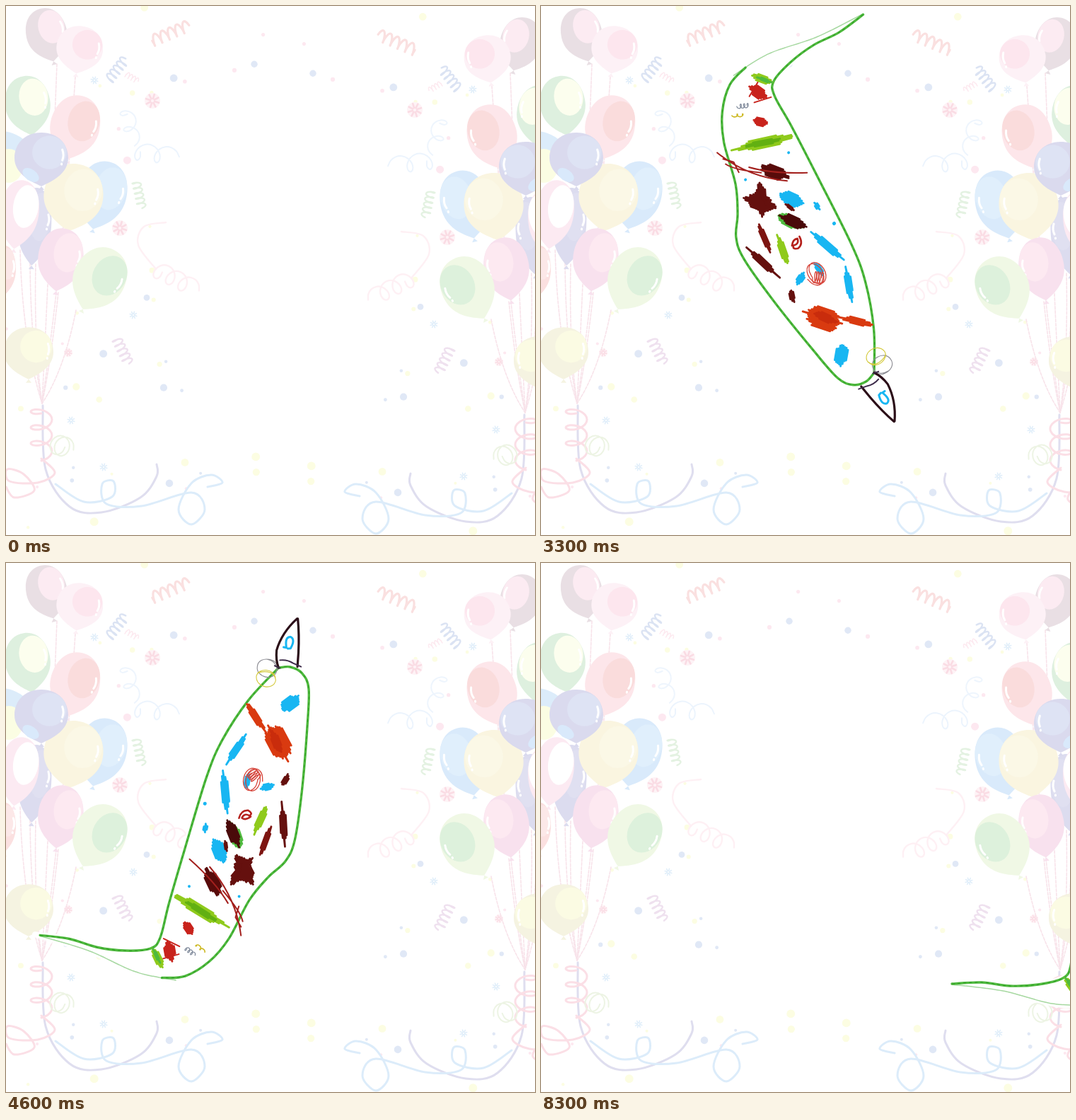
An HTML page that plays this animation: 748x748 px, repeating every 8.8 s.

```html
<!DOCTYPE html>
<html lang="en">
<head>
<meta charset="utf-8">
<title>Party worm</title>
<style>
html, body { margin: 0; width: 100%; height: 100%; overflow: hidden; background: #fff; }
svg { display: block; width: 100vw; height: 100vh; }
</style>
</head>
<body>
<svg id="stage" viewBox="0 0 748 748" fill="none" stroke-linecap="round" stroke-linejoin="round">
  <g id="party"></g>
  <use href="#party" transform="translate(785 13) scale(-1 1)"/>
  <g id="worm" visibility="hidden"></g>
</svg>
<script>
const $ = id => document.getElementById(id);

let seed = 7;
const random = () => (seed = seed * 16807 % 2147483647) / 2147483647;

const line = (d, color, width = 2, dash = 'none') =>
  `<path d="${d}" stroke="${color}" stroke-width="${width}" stroke-dasharray="${dash}"/>`;
const ellipse = (x, y, rx, ry, fill, turn = 0) =>
  `<ellipse rx="${rx}" ry="${ry}" fill="${fill}" transform="translate(${x} ${y}) rotate(${turn})"/>`;

// Catmull-Rom curve through a few points.
function smooth(points) {
  const at = i => points[Math.min(Math.max(i, 0), points.length - 1)];
  let d = 'M' + points[0];
  for (let i = 0; i < points.length - 1; i++) {
    const [p, a, b, q] = [at(i - 1), at(i), at(i + 1), at(i + 2)];
    d += `C${a.map((v, k) => v + (b[k] - p[k]) / 6)} ${b.map((v, k) => v - (q[k] - a[k]) / 6)} ${b}`;
  }
  return d;
}

// A spring between two points; a larger loop makes it curl over itself.
function coil(x1, y1, x2, y2, turns, amp, loop, color, width) {
  const len = Math.hypot(x2 - x1, y2 - y1), ux = (x2 - x1) / len, uy = (y2 - y1) / len;
  const points = [];
  for (let i = 0, n = turns * 10; i <= n; i++) {
    const a = i / 10 * 2 * Math.PI, along = len * i / n + loop * Math.cos(a), off = amp * Math.sin(a);
    points.push([x1 + ux * along - uy * off, y1 + uy * along + ux * off]);
  }
  return line(smooth(points), color, width);
}

function rays(x, y, r, color, width) {
  let d = '';
  for (let a = .3; a < 6.5; a += Math.PI / 4) {
    const c = r * Math.cos(a), s = r * Math.sin(a);
    d += `M${x + c * .35} ${y + s * .35}L${x + c} ${y + s}`;
  }
  return line(d, color, width);
}
const candy = (x, y, r) => ellipse(x, y, r, r, '#fef3f6') + rays(x, y, r * .85, '#fadce4', r * .25);
const flake = (x, y) => rays(x, y, 5, '#e0eefa', 1.6);

// Teardrop with a lighter patch and a glint towards the upper right.
function balloon(x, y, r, turn, fill, shine, tall = 1.32) {
  const h = r * tall, hx = r * .3, hy = -h * .26;
  const d = `M0 ${-h}C${r * .65} ${-h} ${r} ${-h * .55} ${r} ${-h * .05}C${r} ${h * .5} ${r * .45} ${h * .8} 0 ${h}
    l4 5h-8l4-5C${-r * .45} ${h * .8} ${-r} ${h * .5} ${-r} ${-h * .05}C${-r} ${-h * .55} ${-r * .65} ${-h} 0 ${-h}Z`;
  return `<g transform="translate(${x} ${y}) rotate(${turn})"><path d="${d}" fill="${fill}"/>` +
    ellipse(hx, hy, r * .64, h * .62, shine) +
    line(`M${hx + r * .48} ${hy - 4}q3 8 0 15m-1 5v1`, '#fff', 3) + '</g>';
}

function confetti(count) {
  let dots = '';
  while (count) {
    const x = random() * 400, y = random() * 740, r = 2 + 4 * random() ** 2;
    if (x > 250 && y > 110 && y < 620) continue;
    dots += ellipse(x, y, r, r, ['#fde8f0', '#fcfde2', '#fcfde2', '#e0e8f6'][count-- % 4]);
  }
  return dots;
}

function strings(color, tops) {
  return tops.map(([x, y]) => line(`M${x} ${y}Q${x * .75 + 8} ${(y + 600) / 2} 51 562`, color, 1.6, '4 2')).join('');
}

const SKY = '#dcecfa', LILAC = '#dfdeef', ROSE = '#fbdfe6';

$('party').innerHTML = [
  confetti(48),
  candy(207, 134, 11), candy(161, 314, 11), candy(88, 490, 6),
  flake(125, 105), flake(180, 437), flake(92, 586), flake(138, 652),
  coil(205, 50, 257, 28, 5, 8, 2, '#fae0e0', 3.2),
  coil(145, 105, 168, 76, 5, 7, 2, '#dbe3f3', 2.4),
  coil(169, 96, 186, 106, 4, 4, 1, '#fdeaf0', 1.5),
  coil(184, 248, 192, 284, 5, 6, 2, '#e4f2e2', 2.4),
  coil(156, 470, 173, 504, 5, 7, 2, '#efe1ef', 2.4),
  coil(170, 145, 180, 190, 2, 10, 8, '#eef5fd', 2),
  coil(180, 205, 235, 212, 2, 12, 10, '#ecf4fd', 2),
  line(smooth([[226, 306], [195, 312], [187, 338], [212, 372]]), '#fef0f4', 2.4),
  coil(212, 372, 264, 398, 3, 12, 10, '#fef0f4', 2.4),
  strings('#f8e3ea', [[72, 82], [98, 100], [74, 405], [99, 430], [34, 345], [20, 345], [42, 365]]),
  balloon(58, 41, 29, -14, '#e9dfe4', '#fcebf2'),
  balloon(104, 62, 33, 8, '#fdf1f6', '#fde6ee', 1.02),
  balloon(31, 141, 32, -8, '#def0df', '#fcfeee'),
  balloon(97, 172, 35, 14, '#fde6ea', '#fadcdc'),
  ellipse(4, 195, 30, 16, SKY, 20) + ellipse(4, 226, 20, 24, '#fbfde3'),
  balloon(135, 268, 35, 14, '#d9eafb', '#e0effc', 1.4),
  balloon(40, 312, 24, 4, '#dcdcef', '#e0e0f1', 2.3),
  balloon(95, 271, 42, 8, '#faf5e0', '#fbf8e6', 1.14),
  balloon(50, 217, 38, 0, '#dadaee', '#dee3f4', 1),
  ellipse(35, 239, 13, 8, '#d9e9fb', 35),
  balloon(18, 295, 28, 8, '#fceaf2', '#fff', 1.75),
  balloon(-3, 374, 17, 0, '#fbe0e0', '#fce8e8', 2.1),
  balloon(77, 359, 32, 8, '#f8e1ee', '#fde9f1', 1.4),
  balloon(131, 387, 37, 28, '#f0f8e5', '#ddf1dc', 1.28),
  balloon(32, 491, 35, 0, '#f5f3e1', '#fbfbe3', 1.05),
  line(smooth([[52, 565], [56, 655], [90, 708], [135, 716], [190, 695], [213, 665], [213, 648]]), LILAC, 3),
  line(smooth([[70, 676], [110, 701], [150, 694], [152, 672], [136, 676], [142, 704], [192, 707], [262, 688],
    [281, 712], [262, 733], [244, 712], [262, 675], [290, 663], [306, 674], [285, 680]]), SKY, 3),
  coil(50, 568, 50, 635, 3, 15, 8, ROSE, 3),
  line(smooth([[50, 640], [69, 660], [45, 674], [5, 672], [2, 655], [25, 662], [40, 685], [12, 695], [0, 680]]), ROSE, 3),
  coil(72, 620, 84, 624, 2, 14, 12, '#edf4e4', 2)
].join('');

const GREEN = '#4fba3e', LIME = '#8fca1c', CYAN = '#18b6f2', MAROON = '#65100e', RED = '#c8231c', ORANGE = '#d93a10', INK = '#2b0e18';
const BACK = [[636, 166], [652, 162], [670, 168], [683, 188], [690, 240], [698, 330], [700, 402], [692, 434], [672, 460],
  [651, 497], [632, 555], [610, 592], [580, 618], [548, 626]];
const BELLY = [[636, 166], [602, 218], [575, 280], [562, 335], [549, 440], [540, 520], [536, 570], [525, 588],
  [490, 597], [450, 599], [410, 594], [368, 596]];
const HEM = [[368, 597], [440, 606], [510, 624], [568, 626]];

// Back-and-forth felt-pen strokes filling a leaf shape.
function hatch(color, x, y, length, width, turn) {
  const rows = Math.max(2, Math.round(width / 2.2));
  let d = '';
  for (let i = 0; i <= rows; i++) {
    const side = 2 * i / rows - 1, reach = () => length / 2 * (1 - .55 * Math.abs(side)) * (.75 + .3 * random());
    d += `${i ? 'L' : 'M'}${-reach()} ${side * width / 2 - 1}L${reach()} ${side * width / 2}`;
  }
  return `<g transform="translate(${x} ${y}) rotate(${turn})">${line(d, color, 2.8)}</g>`;
}
const pen = (points, color) => line(smooth(points), color, 3.4) + line(smooth(points), '#35a02a', 1.3, '3 5');

$('worm').innerHTML = [
  `<path d="${smooth([...BACK, ...HEM.slice(0, 3).reverse(), ...BELLY.slice().reverse()])}" fill="#fff" stroke="#fff" stroke-width="8"/>`,
  '<path d="M650 92L629 142L636 166L662 160Z" fill="#fff"/>',
  line(smooth(HEM), '#a6d8a0', 1.5, '9 1'),
  pen(BACK, GREEN), pen(BELLY, GREEN),
  hatch(CYAN, 661, 213, 36, 16, -50),
  hatch(ORANGE, 653, 270, 62, 28, 50), hatch(ORANGE, 615, 240, 54, 8, 45), hatch('#c92c0c', 650, 270, 40, 10, 55),
  hatch(CYAN, 597, 290, 52, 8, -68), hatch(CYAN, 591, 352, 68, 9, 73),
  hatch(CYAN, 619, 331, 24, 6, 85), hatch(CYAN, 649, 335, 20, 8, -30),
  hatch(CYAN, 597, 436, 40, 16, 55), hatch(CYAN, 572, 407, 12, 5, 80),
  ellipse(566, 373, 2.5, 2.5, CYAN) + ellipse(564, 492, 2, 2, CYAN) + ellipse(636, 494, 2, 2, CYAN),
  hatch(MAROON, 673, 321, 22, 6, -75), hatch(MAROON, 680, 384, 64, 8, 75), hatch('#7d1511', 660, 410, 54, 6, -82),
  coil(623, 328, 630, 328, 2, 16, 11, '#d6443a', 1.3), coil(622, 318, 632, 326, 4, 8, 2, '#d6443a', 1.3),
  line('M617 385q1-12 11-13q8 3 3 7q-8-3-10 5q6 3 12-4', '#b5211c', 2.6),
  hatch(LIME, 648, 382, 50, 8, -78),
  hatch(GREEN, 617, 412, 42, 14, 58), hatch('#4a0a0a', 612, 408, 42, 13, 55), hatch(MAROON, 605, 427, 18, 3, 65),
  hatch(MAROON, 634, 459, 58, 14, -62), hatch(MAROON, 636, 456, 50, 20, 50), hatch(MAROON, 627, 464, 42, 5, -75),
  hatch('#580b0a', 596, 481, 48, 16, 52),
  line('M558 454Q600 480 622 506M588 460Q632 496 648 548M612 490Q642 515 647 528M638 508l-2 16l10 12', '#a3201d', 2),
  hatch(LIME, 584, 523, 96, 13, 20), hatch('#62b012', 586, 524, 60, 6, 21),
  hatch(RED, 573, 551, 22, 10, 40),
  hatch(RED, 552, 587, 30, 14, 65), line('M541 571l24 7M545 599l21-10', RED, 2),
  hatch(LIME, 537, 600, 36, 9, 50), hatch(GREEN, 535, 597, 24, 3, 50),
  coil(587, 571, 600, 579, 2, 2, 2, '#cdb924', 1.6), coil(574, 579, 587, 586, 3, 3, 2, '#7a8496', 1.2),
  line('M635 169c2-16-30-17-29 0c0 16 28 18 28 1c0-8-8-13-16-13', '#8b8b92', 1.1),
  line('M634 181c-4-13-26-11-27 2c2 17 28 16 28 1c-3-11-15-12-27-6', '#d3c93a', 1.1),
  line('M650 93Q632 116 629 142Q630 156 636 166M651 93Q657 115 660 140L662 160', INK, 3.2),
  line('M636 155Q646 152 655 156L667 159M630 164l8 2', '#3d2b4a', 2),
  line('M638 136l4 0q-5-15 3-16q8 2 3 16l-4 1', CYAN, 3)
].join('');

// Turning points of the flight: time, centre x, centre y, degrees.
const KEYS = [
  [100, 502, -140, 170], [600, 505, -95, 170], [1600, 500, 105, 170], [2600, 497, 279, 170], [3300, 478, 300, 146.3],
  [3800, 114, 73, 52.5], [4600, 230, 302, 9.8], [4800, 242, 308, 8.5], [5400, 331, 327, 4],
  [5800, 444, 339, 1], [6300, 509, 344, 0], [8300, 722, 343, 0]
];
const LOOP = 8800, LAST = 6300;

// The worm moves in hard steps whose length varies along the loop.
function heldTime(t) {
  const [start, step] = t < 3100 ? [100, 500] : t < 4800 ? [3100, 100] : t < 5800 ? [4800, 200] : [5800, 500];
  return start + Math.floor((t - start) / step) * step;
}

function poseAt(t) {
  const i = Math.max(1, KEYS.findIndex(k => k[0] >= t));
  const a = KEYS[i - 1], b = KEYS[i];
  let f = (t - a[0]) / (b[0] - a[0]);
  if (t > LAST) f = f * (3 + f) / 4; // speeds up on the way out
  return a.map((v, n) => v + (b[n] - v) * f);
}

function draw() {
  const t = (performance.now() - origin) % LOOP, worm = $('worm');
  worm.setAttribute('visibility', t < 100 ? 'hidden' : 'visible');
  if (t >= 100) {
    const [, x, y, turn] = poseAt(heldTime(t));
    worm.setAttribute('transform', `translate(${x} ${y}) rotate(${turn}) translate(-509 -344)`);
  }
  requestAnimationFrame(draw);
}
const origin = performance.now();
draw();
</script>
</body>
</html>
```
